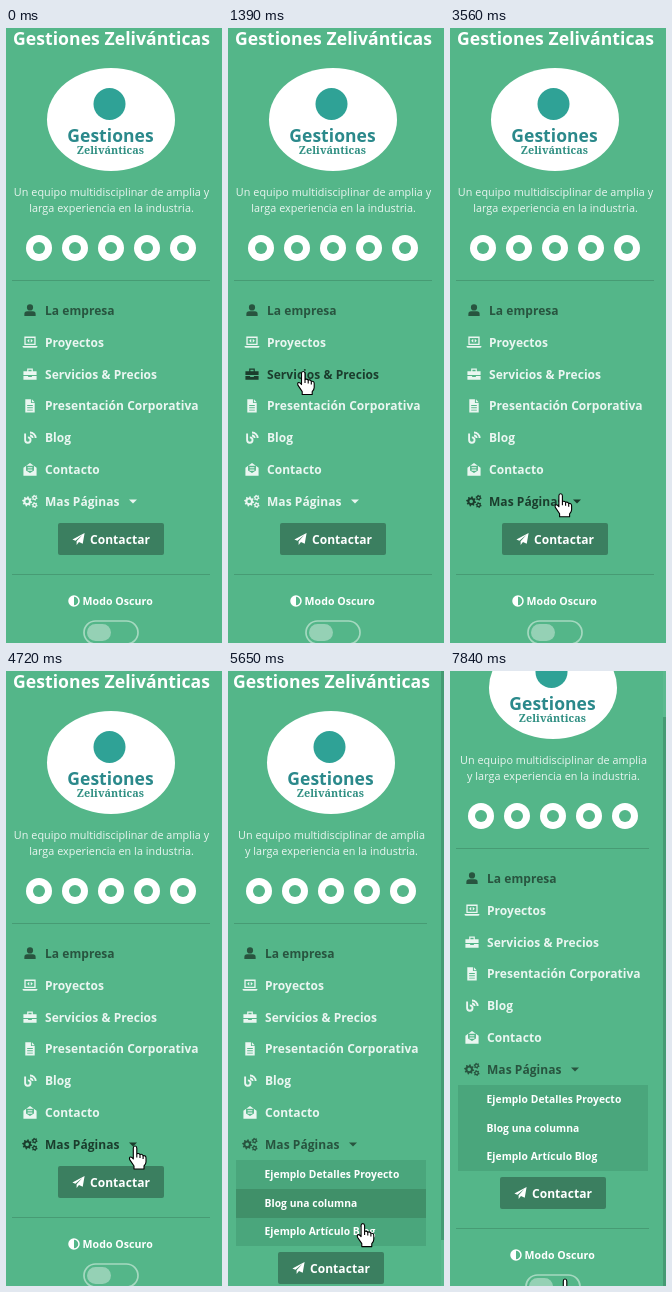
Recreate the animation shown at these times as an HTML page with a canvas. Size 216x615 px, loop 8000 ms.

```html
<!DOCTYPE html>
<html lang="es">
<head>
<meta charset="utf-8">
<title>Menú lateral</title>
<style>
html, body { margin: 0; width: 100%; height: 100%; overflow: hidden; background: #54b689; }
canvas { display: block; }
</style>
</head>
<body>
<canvas width="216" height="615"></canvas>
<script>
const ctx = document.querySelector('canvas').getContext('2d');
const LOOP = 8000, OPEN = 4800, SCROLL = 6180, REHOVER = 6640, OFFSET = 75;
const SANS = '"Open Sans", "Noto Sans", sans-serif';
const GREEN = '#54b689', LIGHT = '#eaf6f1', ACTIVE = '#28543f', HOVER = '#1b3d2d', TEAL = '#2b898b';
const RULE = '#479b74', SWITCH = '#a5d9c0';

const gears = (...list) => {
  const path = new Path2D();
  for (const [x, y, r, teeth] of list) {
    for (let i = 0; i < teeth * 4; i++) {
      const a = (i + .5) / (teeth * 4) * Math.PI * 2, d = i % 4 < 2 ? r : r * .74;
      path[i ? 'lineTo' : 'moveTo'](x + d * Math.cos(a), y + d * Math.sin(a));
    }
    path.closePath();
    path.moveTo(x + r * .35, y);
    path.arc(x, y, r * .35, 0, Math.PI * 2);
  }
  return path;
};

const ICONS = {
  user: new Path2D('M-3.3-3.2a3.3 3.3 0 1 0 6.6 0a3.3 3.3 0 1 0-6.6 0M-6 6V4Q-6 1-3 1H3Q6 1 6 4V6Z'),
  laptop: new Path2D('M-6-6H6V3H-6ZM-4.6-4.6V1.6H4.6V-4.6ZM-8 4H8Q8 6 6 6H-6Q-8 6-8 4ZM-.8-3.6L-3-1.5L-.8.6ZM.8-3.6L3-1.5L.8.6Z'),
  case: new Path2D('M-7-3H-3V-6H3V-3H7V1H-7ZM-1.7-3H1.7V-4.7H-1.7ZM-7 2H-2V3.2H2V2H7V6H-7Z'),
  file: new Path2D('M-5-7H1V-3H5V7H-5ZM2-7L5-4H2ZM-3-1V0H3V-1ZM-3 1.5V2.5H3V1.5ZM-3 4V5H3V4Z'),
  blog: new Path2D('M-5.2-4.5V2.5a2.9 2.9 0 1 0 2.9-2.9M0-5.6A6 6 0 0 1 6 .4M0-2.4A2.8 2.8 0 0 1 2.8.4'),
  mail: new Path2D('M-7-2L0-7L7-2V6.5H-7ZM-4.2-4V1L0 3.8L4.2 1V-4ZM-2.5-2.5H2.5V-1.3H-2.5ZM-2.5 0H2.5V1.2H-2.5Z'),
  cogs: gears([-3, 0, 5.4, 8], [4.9, -3.9, 3.2, 6], [4.9, 3.9, 3.2, 6]),
  plane: new Path2D('M6.5-6.5L4.5 5L.5 3.3L-2 6.5V2.4L4-4.2L-3.3 1.8L-6.5.4Z'),
};
const HAND = new Path2D('M-1.7 2Q-1.7 0 0 0T1.8 2V7.8Q4 7 5 8.5Q7.4 7.8 8.1 9.7Q11 9.2 11 12V16Q11 18 9 20V23H-1V20L-5.3 13.6Q-6 11-4.4 11Q-3 11-1.7 13Z');
const FINGERS = new Path2D('M1.8 8V11.5M5 8.5V12M8.1 9.7V13');
const ARROW = new Path2D('M.5.5V16L4 12.6L6.5 18.5L8.8 17.5L6.3 11.7H11.5Z');

const MENU = [
  ['user', 'La empresa'], ['laptop', 'Proyectos'], ['case', 'Servicios & Precios'],
  ['file', 'Presentación Corporativa'], ['blog', 'Blog'], ['mail', 'Contacto'], ['cogs', 'Mas Páginas'],
];
const SUBMENU = ['Ejemplo Detalles Proyecto', 'Blog una columna', 'Ejemplo Artículo Blog'];

// start ms, end ms, pointer updates, x, y
const MOVES = [
  [60, 840, 11, 78, 303], [930, 1710, 11, 74, 361], [1770, 2560, 11, 59, 408],
  [2620, 3020, 6, 62, 447], [3170, 3870, 10, 137, 476], [4020, 4190, 3, 128, 475],
  [4340, 4420, 2, 127, 474], [4650, 4720, 2, 129, 475], [5110, 5200, 2, 130, 474],
  [5350, 5890, 8, 137, 589], [6640, 6710, 2, 129, 563], [6940, 7310, 5, 102, 600],
  [7390, 7680, 5, 115, 601], [7750, 7840, 2, 115, 608],
];

function pointerAt(t) {
  let x = 180, y = 263;
  for (const [start, end, n, toX, toY] of MOVES) {
    if (t < start) break;
    const k = Math.min(1, (Math.floor((t - start) * (n - 1) / (end - start) + .25) + 1) / n);
    const ease = k * k * (3 - 2 * k);
    x += (toX - x) * ease;
    y += (toY - y) * ease;
  }
  return { x, y };
}

function text(str, x, y, font, color, align = 'left') {
  ctx.font = font;
  ctx.fillStyle = color;
  ctx.textAlign = align;
  ctx.fillText(str, x, y);
}

function box(x, y, w, h, color, r = 0) {
  ctx.fillStyle = color;
  ctx.beginPath();
  ctx.roundRect(x, y, w, h, r);
  ctx.fill();
}

function oval(x, y, rx, ry, color) {
  ctx.fillStyle = color;
  ctx.beginPath();
  ctx.ellipse(x, y, rx, ry, 0, 0, Math.PI * 2);
  ctx.fill();
}

function icon(name, x, y, color) {
  ctx.save();
  ctx.translate(x, y);
  ctx.scale(.94, .94);
  ctx.fillStyle = ctx.strokeStyle = color;
  ctx.lineWidth = 2;
  if (name === 'blog') ctx.stroke(ICONS.blog);
  else ctx.fill(ICONS[name], 'evenodd');
  ctx.restore();
}

function drawHeader(mid, open) {
  text('Gestiones Zelivánticas', mid, 17, `700 17.6px ${SANS}`, '#fff', 'center');
  oval(mid - .5, 91.5, 64, 51.5, '#fff');
  oval(mid - 2, 76, 16, 16, '#2fa296');
  text('Gestiones', mid - 1, 114, `700 17.5px ${SANS}`, TEAL, 'center');
  text('Zelivánticas', mid - 1, 126, '600 10.8px "Noto Serif", serif', '#2f8f82', 'center');
  const lines = open
    ? ['Un equipo multidisciplinar de amplia', 'y larga experiencia en la industria.']
    : ['Un equipo multidisciplinar de amplia y', 'larga experiencia en la industria.'];
  lines.forEach((line, i) => text(line, mid, 168 + 16 * i, `500 10.8px ${SANS}`, LIGHT, 'center'));
  for (let i = -2; i <= 2; i++) {
    oval(mid - .5 + 36 * i, 220, 13, 13, '#fff');
    oval(mid - .5 + 36 * i, 220, 6, 6, GREEN);
  }
}

function drawMenu(dx, open, hovered) {
  MENU.forEach(([name, label], i) => {
    const y = 282.4 + 31.83 * i, last = i === 6;
    const color = hovered === label && i ? HOVER : i === 0 || (last && open) ? ACTIVE : LIGHT;
    icon(name, 24 + dx, y, color);
    text(label, 39 + dx, Math.round(y + 4.5), `700 12px ${SANS}`, color);
    if (last) {
      ctx.beginPath();
      ctx.moveTo(123 + dx, 471.5);
      ctx.lineTo(131 + dx, 471.5);
      ctx.lineTo(127 + dx, 475.5);
      ctx.fill();
    }
  });
  if (!open) return;
  box(8, 489, 190, 86, '#4aa67c');
  SUBMENU.forEach((label, i) => {
    const y = 489 + 28.67 * i;
    if (hovered === label) box(8, Math.round(y), 190, 29, '#409069');
    text(label, 36.5, Math.round(y + 18), `700 10.3px ${SANS}`, '#fff');
  });
}

function drawFooter(dx, dy, right, hovered) {
  ctx.save();
  ctx.translate(dx, dy);
  box(52, 495, 106, 32, hovered === 'Contactar' ? '#326d52' : '#3b7f60', 2);
  icon('plane', 72.5, 511, '#fff');
  text('Contactar', 84, 516, `700 12px ${SANS}`, '#fff');
  box(6 - dx, 546, right - 6, 1, RULE);

  ctx.strokeStyle = '#fff';
  ctx.lineWidth = 1.5;
  ctx.beginPath();
  ctx.arc(68, 573, 5, 0, Math.PI * 2);
  ctx.stroke();
  ctx.fillStyle = '#fff';
  ctx.beginPath();
  ctx.arc(68, 573, 5, Math.PI / 2, Math.PI * 1.5);
  ctx.fill();
  text('Modo Oscuro', 76.5, 577, `700 10.6px ${SANS}`, '#fff');

  ctx.strokeStyle = SWITCH;
  ctx.lineWidth = 1.7;
  ctx.beginPath();
  ctx.roundRect(78, 593, 54, 23, 11.5);
  ctx.stroke();
  box(81, 596, 24, 17, '#95d1b5', 8.5);
  ctx.restore();
}

function hitTest({ x, y }, open) {
  const row = Math.floor((y - 266.5) / 31.83);
  if (row >= 0 && row < MENU.length && y < 489) return MENU[row][1];
  if (!open) return '';
  if (y >= 489 && y < 575) return SUBMENU[Math.floor((y - 489) / 28.67)];
  if (y >= 581 && y < 613 && x >= 50 && x < 156) return 'Contactar';
  return y >= 673 && x >= 75 && x < 131 ? 'switch' : '';
}

function drawPointer({ x, y }, hand) {
  ctx.save();
  ctx.translate(x, y);
  ctx.fillStyle = '#fff';
  ctx.strokeStyle = '#000';
  ctx.lineWidth = 1.1;
  ctx.lineJoin = 'round';
  const shape = hand ? HAND : ARROW;
  ctx.fill(shape);
  ctx.stroke(shape);
  if (hand) ctx.stroke(FINGERS);
  ctx.restore();
}

function draw(t) {
  const open = t >= OPEN, scroll = t >= SCROLL ? OFFSET : 0;
  const dx = open ? -2 : 0, right = open ? 199 : 204;
  // Hover styles trail the pointer by one update
  const probe = pointerAt(t - 80);
  if (t >= REHOVER) probe.y += OFFSET;
  const hovered = t >= 60 ? hitTest(probe, open) : '';

  box(0, 0, 216, 615, GREEN);
  ctx.letterSpacing = '0.05px';
  ctx.save();
  ctx.translate(0, -scroll);
  drawHeader(105.5 + dx, open);
  box(6, 252, right - 6, 1, RULE);
  drawMenu(dx, open, hovered);
  drawFooter(dx, open ? 86 : 0, right, hovered);
  ctx.restore();
  if (open) {
    box(213, 0, 3, 615, '#5bb98e');
    box(213, scroll ? 46 : 0, 3, 569, '#459a73');
  }
  if (t >= 60) drawPointer(pointerAt(t), hovered !== '');
}

function tick() {
  draw(performance.now() % LOOP);
  requestAnimationFrame(tick);
}
tick();
</script>
</body>
</html>
```
